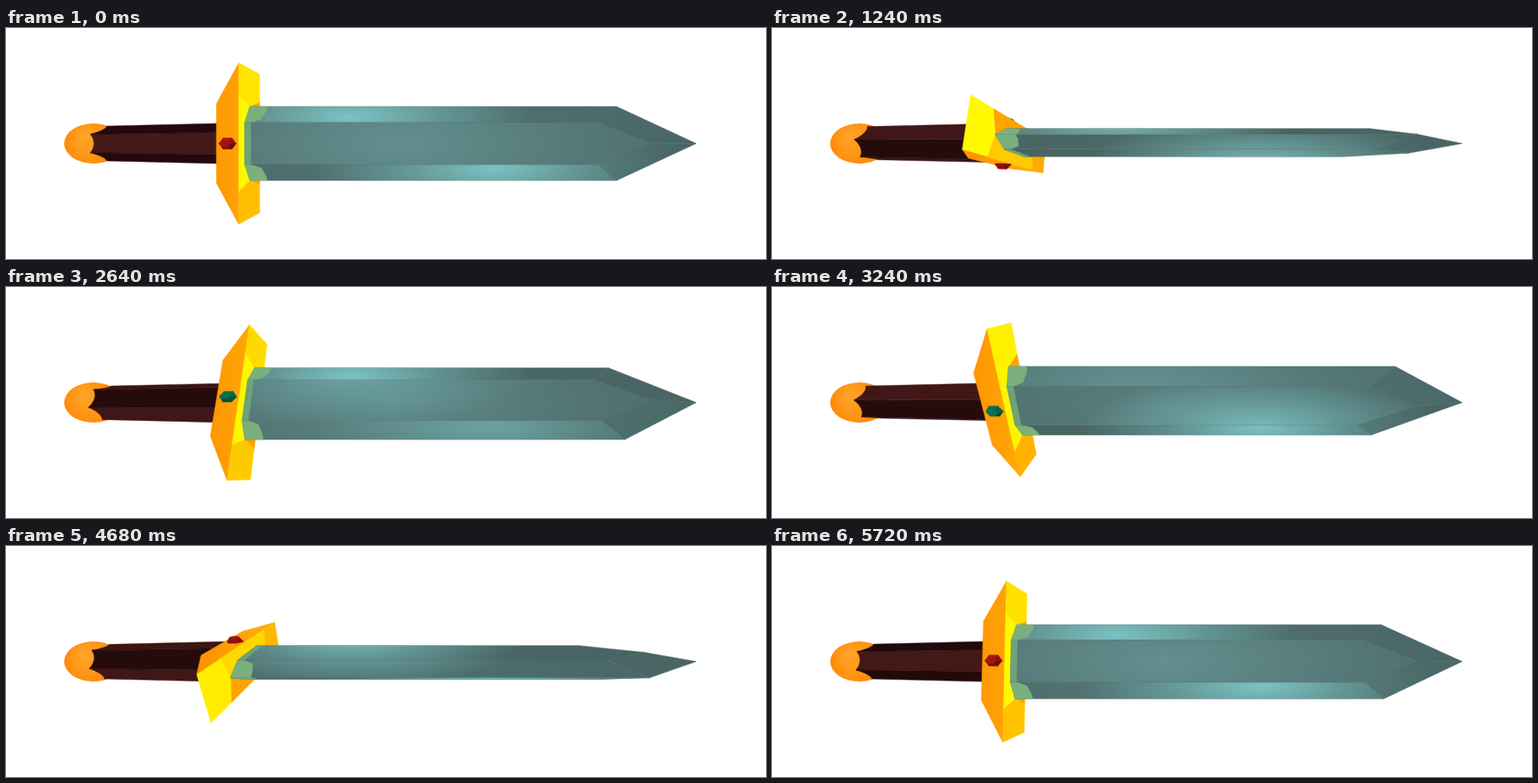
These frames come from a looping animation (849x259 px, 5760 ms). An HTML page with a canvas:

```html
<!DOCTYPE html>
<html lang="en">
<head>
<meta charset="utf-8">
<title>Turning sword</title>
<style>
html, body { margin: 0; width: 100%; height: 100%; overflow: hidden; background: #fff; }
canvas { display: block; }
</style>
</head>
<body>
<canvas id="stage" width="849" height="259"></canvas>
<script>
const ctx = document.getElementById("stage").getContext("2d");
const W = 849, H = 259, CX = 424, CY = 129.5;
const LOOP = 5760, STEP = 40, CAM = 306;
let sin = 0, cos = 1;

// Model space: x along the sword, y up, z toward the viewer; it turns about x.
const turn = ([x, y, z]) => [x, y * cos - z * sin, y * sin + z * cos];

function project([x, y, z]) {
  const s = CAM / (CAM - z);
  return [CX + x * s, CY - y * s];
}

const sub = (a, b) => a.map((v, i) => v - b[i]);
const dot = (a, b) => a[0] * b[0] + a[1] * b[1] + a[2] * b[2];
const cross = (a, b) => [
  a[1] * b[2] - a[2] * b[1],
  a[2] * b[0] - a[0] * b[2],
  a[0] * b[1] - a[1] * b[0]
];
const rgb = (r, g, b) => `rgb(${r | 0},${g | 0},${b | 0})`;
const clamp = (v, lo, hi) => Math.min(hi, Math.max(lo, v));
const mirror = (pts, sy, sz) => pts.map(([x, y, z]) => [x, y * sy, z * sz]);

// Returns the turned face when it looks at the camera, with its unit normal.
function facing(pts, core) {
  const p = pts.map(turn);
  let n = cross(sub(p[1], p[0]), sub(p[2], p[0]));
  const len = Math.hypot(...n);
  n = n.map(v => v / len);
  if (dot(n, sub(p[0], turn(core))) < 0) n = n.map(v => -v);
  return dot(n, sub([0, 0, CAM], p[0])) > 0 ? { p, n } : null;
}

function trace(p) {
  ctx.beginPath();
  p.forEach(v => ctx.lineTo(...project(v)));
  ctx.closePath();
}

function paint(p, color) {
  trace(p);
  ctx.fillStyle = ctx.strokeStyle = color;
  ctx.lineWidth = 0.5;
  ctx.fill();
  ctx.stroke();
}

function glow(x, y, rx, ry, color, alpha) {
  if (alpha <= 0) return;
  ctx.save();
  ctx.translate(x, y);
  ctx.scale(rx, ry);
  const g = ctx.createRadialGradient(0, 0, 0, 0, 0, 1);
  g.addColorStop(0, `rgba(${color},${alpha})`);
  g.addColorStop(0.5, `rgba(${color},${alpha * 0.45})`);
  g.addColorStop(1, `rgba(${color},0)`);
  ctx.fillStyle = g;
  ctx.fillRect(-1, -1, 2, 2);
  ctx.restore();
}

// Pommel and grip
const BALL = { x: -322.5, r: 22.4 };

function drawPommel() {
  const g = ctx.createRadialGradient(86, 121, 2, 97, 130, 36);
  g.addColorStop(0, "#ffa428");
  g.addColorStop(0.55, "#ff9312");
  g.addColorStop(1, "#ff7f00");
  ctx.fillStyle = g;
  ctx.beginPath();
  ctx.ellipse(97.7, CY, 32.7, 22.5, 0, 0, Math.PI * 2);
  ctx.fill();
}

function drawGrip() {
  for (let i = 0; i < 6; i++) {
    const mid = i * Math.PI / 3;
    const at = (a, r, x) => [x, r * Math.sin(a), r * Math.cos(a)];
    const a = mid - Math.PI / 6, b = mid + Math.PI / 6;
    const face = [at(a, 22.8, -174.5), at(b, 22.8, -174.5)];
    const p = at(b, 19.5, 0), q = at(a, 19.5, 0);
    for (let k = 0; k <= 6; k++) {
      const y = p[1] + (q[1] - p[1]) * k / 6;
      const z = p[2] + (q[2] - p[2]) * k / 6;
      face.push([BALL.x + Math.sqrt(BALL.r ** 2 - y * y - z * z), y, z]);
    }
    const f = facing(face, [-240, 0, 0]);
    if (!f) continue;
    const l = 0.85 + 0.2 * Math.max(0, f.n[2]);
    paint(f.p, i % 2 ? rgb(36 * l, 11 * l, 12 * l) : rgb(66 * l, 23 * l, 23 * l));
  }
}

// Guard
const GX = -151.5, GL = -174.5, GY = 83.6, GZ = 23.4, SEAM = 50;
const EDGE = 41.5, FLAT = 22.7, THICK = 11;
const GUARD_CORE = [-162, 0, 0];

function drawGuard() {
  for (const k of [1, -1]) {
    const side = facing([
      [GL, 41, k * GZ], [GX, GY, k * GZ], [GX, -GY, k * GZ], [GL, -41, k * GZ]
    ], GUARD_CORE);
    if (side) {
      const g = ctx.createLinearGradient(220, 0, 285, 0);
      g.addColorStop(0, "#ff9200");
      g.addColorStop(1, "#ffac08");
      paint(side.p, g);
    }
  }
  for (const k of [1, -1]) {
    const strip = facing([
      [GX, SEAM, k * GZ], [GX, EDGE, 0], [GX, FLAT, k * THICK],
      [GX, -FLAT, k * THICK], [GX, -EDGE, 0], [GX, -SEAM, k * GZ]
    ], GUARD_CORE);
    if (strip) paint(strip.p, rgb(255, 163 + 85 * Math.sqrt(Math.max(0, k * cos)), 0));
  }
  for (const k of [1, -1]) {
    const end = facing([
      [GX, k * GY, GZ], [GX, k * GY, -GZ], [GX, k * SEAM, -GZ],
      [GX, k * EDGE, 0], [GX, k * SEAM, GZ]
    ], GUARD_CORE);
    const [, y, z] = turn([GX, k * 66, 0]);
    if (end) paint(end.p, rgb(255, clamp(210 + z * 0.55 + y * 0.28, 145, 248), 0));
  }
}

// Gems: a hexagonal stone with a smaller raised table
function drawGem(k) {
  const ring = (rx, ry, z) => Array.from({ length: 6 }, (_, i) => {
    const a = i * Math.PI / 3;
    return [-163 + rx * Math.cos(a), ry * Math.sin(a), k * z];
  });
  const low = ring(9, 6.6, GZ), high = ring(5, 3.8, GZ + 5);
  const core = [-163, 0, k * (GZ + 1)];
  const tint = l => k > 0 ? rgb(172 * l, 20 * l, 20 * l) : rgb(4 * l, 120 * l, 88 * l);
  for (let i = 0; i < 6; i++) {
    const j = (i + 1) % 6;
    const f = facing([low[i], low[j], high[j], high[i]], core);
    if (f) paint(f.p, tint(0.82 + 0.2 * f.n[1] - 0.1 * f.n[0]));
  }
  const top = facing(high, core);
  if (top) paint(top.p, tint(0.95));
}

const gemInFront = k => CAM * k * cos > GZ;

// Blade
const BLADE_CORE = [60, 0, 0];
const SHOULDER = [258, EDGE, 0], CORNER = [228, FLAT, THICK];
const RIDGE = [285, 0, THICK], POINT = [347, 0, 0];
const BEVEL = [[GX, EDGE, 0], SHOULDER, CORNER, [GX, FLAT, THICK]];
const TIP = [SHOULDER, POINT, RIDGE, CORNER];
const BEVEL_COLLAR = [
  [GX, EDGE, 0], [-132, EDGE, 0], [-132, 36, 3.2],
  [-135, 26.8, 8.6], [-145, FLAT, THICK], [GX, FLAT, THICK]
];

function steel(face, dim = 1) {
  const f = facing(face, BLADE_CORE);
  if (!f) return;
  paint(f.p, "#486463");
  const [, ny, nz] = f.n;
  ctx.save();
  trace(f.p);
  ctx.clip();
  glow(440, CY, 420, 150, "112,164,164", 0.68 * dim * Math.max(0, nz) ** 6);
  const power = clamp(Math.abs(ny) * 3 - 0.25, 0, 1) * dim;
  if (ny > 0) glow(385, 100, 200, 58, "124,194,194", power);
  else glow(545, 157, 200, 58, "124,194,194", power);
  ctx.restore();
}

function collar(face, color) {
  const f = facing(face, BLADE_CORE);
  if (f) paint(f.p, color);
}

function drawBlade() {
  for (const sz of [1, -1]) {
    for (const sy of [1, -1]) {
      steel(mirror(TIP, sy, sz), 0.6);
      steel(mirror(BEVEL, sy, sz));
      collar(mirror(BEVEL_COLLAR, sy, sz), "#7bb07c");
    }
    steel([
      [GX, FLAT, sz * THICK], [228, FLAT, sz * THICK], [285, 0, sz * THICK],
      [228, -FLAT, sz * THICK], [GX, -FLAT, sz * THICK]
    ]);
    collar([
      [GX, FLAT, sz * THICK], [-145, FLAT, sz * THICK],
      [-145, -FLAT, sz * THICK], [GX, -FLAT, sz * THICK]
    ], "#6fa276");
  }
}

function draw(ms) {
  const angle = Math.floor((ms % LOOP) / STEP) * STEP / LOOP * Math.PI * 2;
  sin = Math.sin(angle);
  cos = Math.cos(angle);
  ctx.fillStyle = "#fff";
  ctx.fillRect(0, 0, W, H);
  drawPommel();
  drawGrip();
  for (const k of [1, -1]) if (!gemInFront(k)) drawGem(k);
  drawGuard();
  for (const k of [1, -1]) if (gemInFront(k)) drawGem(k);
  drawBlade();
}

let start = null;
function tick(now) {
  if (start === null) start = now;
  draw(Math.max(0, now - start));
  requestAnimationFrame(tick);
}
draw(0);
requestAnimationFrame(tick);
</script>
</body>
</html>
```
